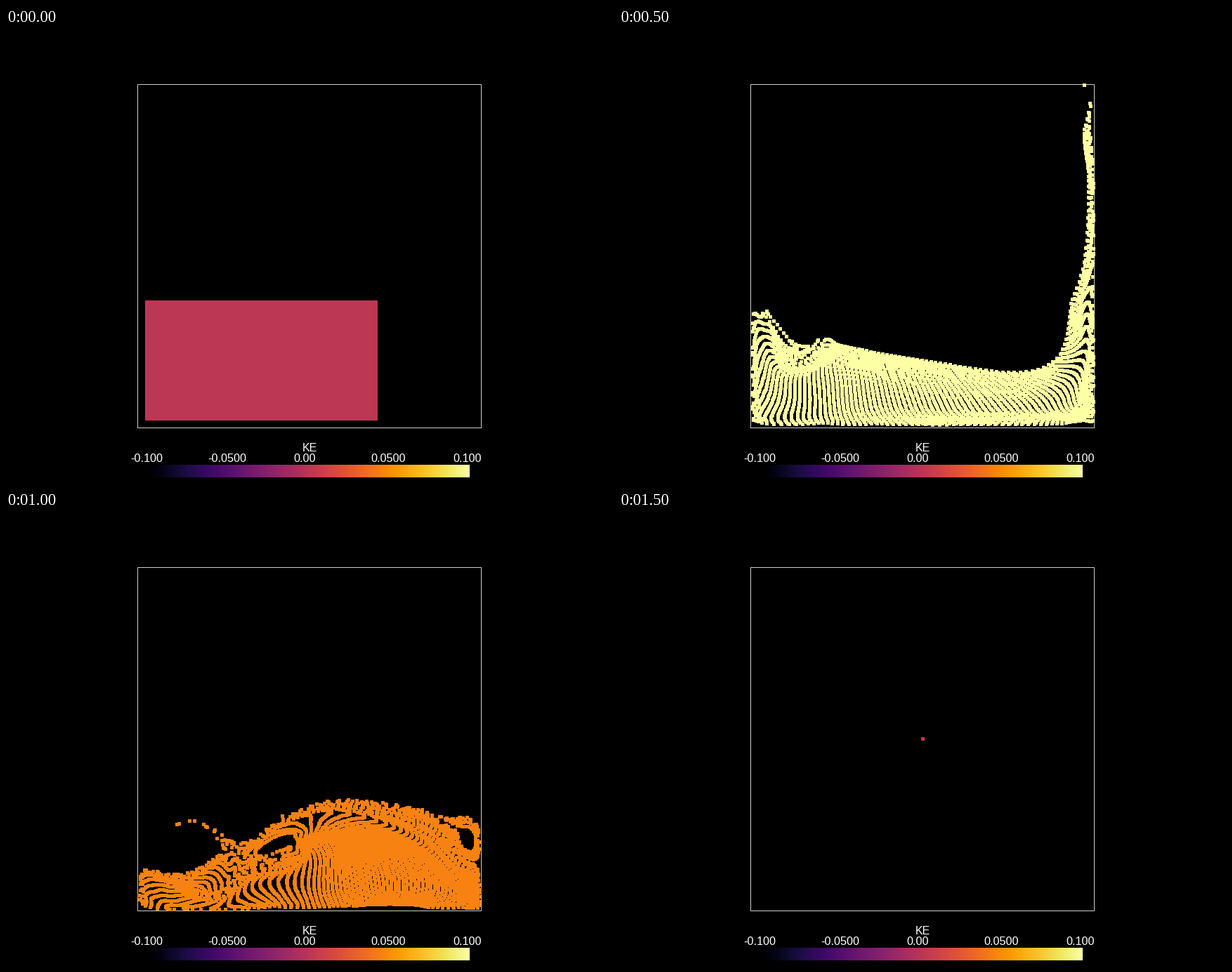
A matplotlib script that plays this animation: 864 by 648 pixels, repeating every 2 s.

```python
import numpy as np
import matplotlib.pyplot as plt
from matplotlib.animation import FuncAnimation
from matplotlib.patches import Rectangle

W, H, DPI = 864, 648, 72
STEP, FRAMES, MOVING = 100, 20, 15
CMAP = plt.get_cmap("inferno")

# Tank on screen: left edge, floor and side length in pixels.
LEFT, FLOOR, SIDE = 188, 568, 488

# Weakly compressible fluid on a background grid; unit tank, SI-like units.
COLS, ROWS = 81, 42
CELLS, PAD = 60, 3
NODES = CELLS + 2 * PAD + 1
DX = 1 / CELLS
GRAVITY, STIFFNESS = 9.8, 200
DT, SUBSTEPS = 5e-4, 200
OFFSETS = np.array([(i, j) for i in range(3) for j in range(3)]).T


class Fluid:
    def __init__(self):
        px, py = np.meshgrid(np.linspace(200, 526, COLS), np.linspace(556, 390, ROWS))
        self.x = np.array([(px.ravel() - LEFT) / SIDE, (FLOOR - py.ravel()) / SIDE])
        count = self.x.shape[1]
        self.v = np.zeros((2, count))
        self.c = np.zeros((2, 2, count))  # local velocity gradient
        self.vol = np.ones(count)         # volume relative to rest

    def stencil(self):
        """Nodes, weights and offsets of the 3 x 3 nodes around each particle."""
        cell = self.x / DX + PAD
        base = (cell - 0.5).astype(int)
        f = cell - base
        w = np.array([0.5 * (1.5 - f) ** 2, 0.75 - (f - 1) ** 2, 0.5 * (f - 0.5) ** 2])
        weight = (w[:, None, 0] * w[None, :, 1]).reshape(9, -1)
        node = base[0] * NODES + base[1] + (OFFSETS[0] * NODES + OFFSETS[1])[:, None]
        dist = (OFFSETS[:, :, None] - f[:, None, :]) * DX
        return node, weight, dist

    def advance(self):
        node, weight, dist = self.stencil()
        flat, size = node.ravel(), NODES * NODES
        mass = np.maximum(np.bincount(flat, weight.ravel(), size), 1e-9)
        push = 4 * DT * STIFFNESS * (1 - self.vol) / DX ** 2
        for d in range(2):
            flow = self.v[d] + self.c[d, 0] * dist[0] + self.c[d, 1] * dist[1]
            momentum = weight * (flow + push * dist[d])
            grid = np.bincount(flat, momentum.ravel(), size) / mass
            grid = grid.reshape(NODES, NODES)
            if d == 1:
                grid -= DT * GRAVITY
            walls = grid if d == 0 else grid.T
            walls[:PAD + 1] = np.maximum(walls[:PAD + 1], 0)
            walls[PAD + CELLS:] = np.minimum(walls[PAD + CELLS:], 0)
            carried = weight * grid.ravel()[node]
            self.v[d] = carried.sum(axis=0)
            self.c[d] = 4 / DX ** 2 * (carried * dist).sum(axis=1)
        self.vol = np.clip(self.vol * (1 + DT * (self.c[0, 0] + self.c[1, 1])), 0.7, 1.15)
        self.x = np.clip(self.x + DT * self.v, 0.003, 0.997)

    def pixels(self):
        return LEFT + SIDE * self.x[0], FLOOR - SIDE * self.x[1]


def simulate():
    fluid = Fluid()
    states = [fluid.pixels()]
    for _ in range(MOVING - 1):
        for _ in range(SUBSTEPS):
            fluid.advance()
        states.append(fluid.pixels())
    return states


def energy(t):
    return np.interp(t, [0, 300, 700, 1000, 1300], [0, 0.12, 0.12, 0.045, 0.057])


states = simulate()

fig = plt.figure(figsize=(W / DPI, H / DPI), dpi=DPI, facecolor="black")
ax = fig.add_axes([0, 0, 1, 1])
ax.imshow(np.linspace(0, 1, 256)[None, :], cmap=CMAP, aspect="auto",
          extent=(204, 660, 640, 622), interpolation="nearest")
ax.set(xlim=(0, W), ylim=(H, 0))
ax.axis("off")
ax.add_patch(Rectangle((187, 80), 489, 489, fill=False, ec="0.8", lw=1))


def label(x, y, text, size=16.3):
    ax.text(x, y, text, color="white", family="Liberation Sans", size=size,
            ha="center", va="baseline")


label(432, 603, "KE", 16)
for x, text in [(200, "-0.100"), (314.5, "-0.0500"), (425, "0.00"),
                (544, "0.0500"), (656.5, "0.100")]:
    label(x, 617.5, text)

dots, = ax.plot([], [], "s", ms=5, mew=0, zorder=3)


def draw(i):
    if i < MOVING:
        points, ke = states[i], energy(i * STEP)
    else:
        points, ke = ([432], [324]), 0
    dots.set_data(*points)
    dots.set_color(CMAP((ke + 0.1) / 0.2))
    return dots,


anim = FuncAnimation(fig, draw, frames=FRAMES, interval=STEP, repeat=True, repeat_delay=0)
plt.show()
```
